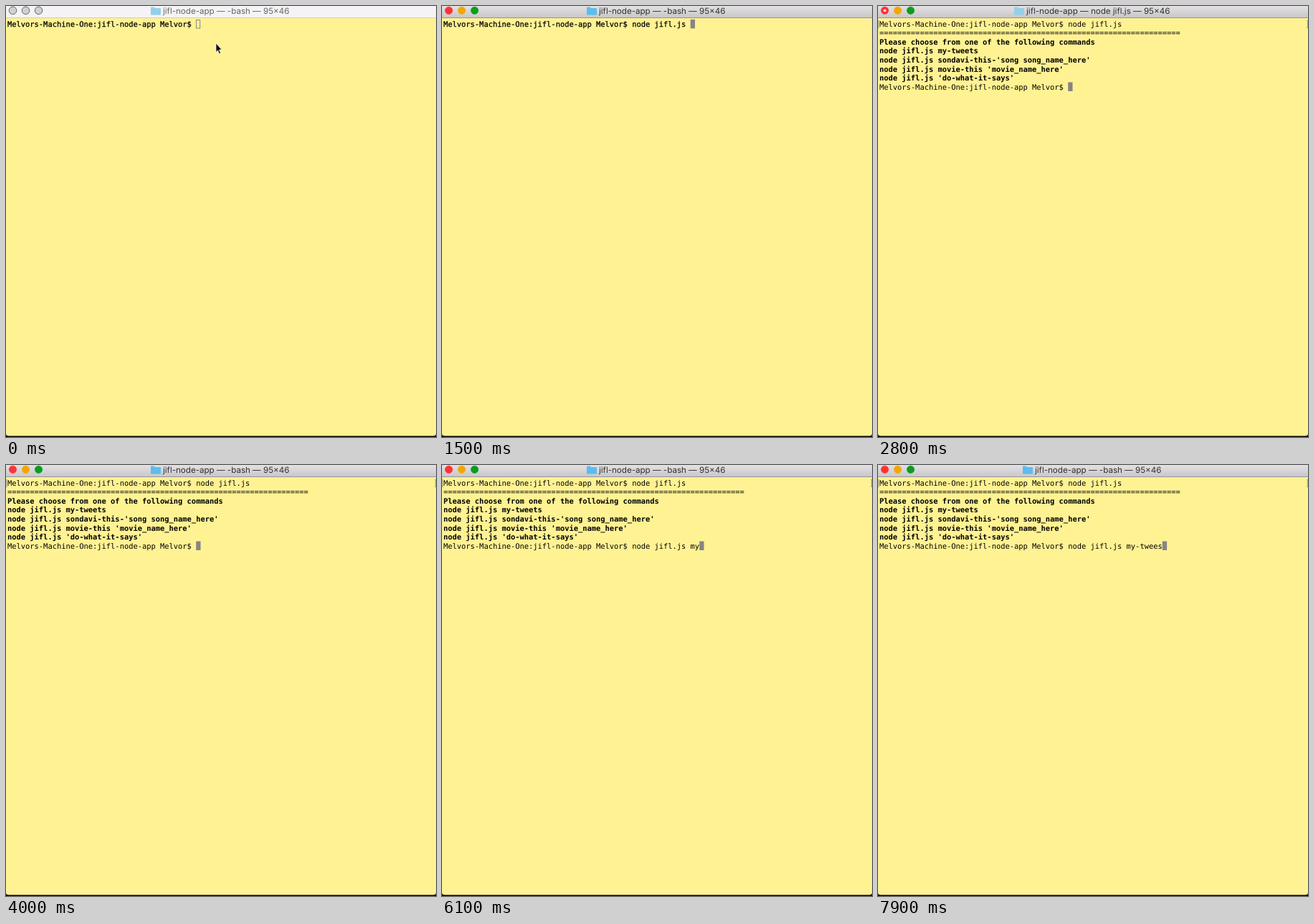
Write an HTML page that moves like this. It is 600 px wide and 602 px high and loops after 8000 ms.

```html
<!DOCTYPE html>
<html lang="en">
<head>
<meta charset="utf-8">
<title>Terminal</title>
<style>
  html, body { margin: 0; width: 100%; height: 100%; overflow: hidden; background: #fff293; }
  svg { display: block; }
  text { white-space: pre; text-rendering: geometricPrecision; }
  #screen { font: 10.41px "DejaVu Sans Mono", monospace; }
  #screen .bold { font-weight: bold; }
  #title { font: 11.6px Inter, sans-serif; text-anchor: middle; }
</style>
</head>
<body>
<svg width="600" height="602" viewBox="0 0 600 602">
  <defs>
    <linearGradient id="chrome" x2="0" y2="1">
      <stop stop-color="#e3e1e3"/>
      <stop offset="1" stop-color="#c9c7ca"/>
    </linearGradient>
  </defs>
  <rect width="600" height="602"/>
  <path d="M0 0H600V597Q600 600.5 596.5 600.5H3.5Q0 600.5 0 597Z" fill="#fff293"/>
  <rect id="bar" width="600" height="16"/>
  <rect id="edge" y="16" width="600" height="1"/>
  <g id="lights">
    <circle cx="9.5" cy="6.3" r="5.3"/>
    <circle cx="27.5" cy="6.3" r="5.3"/>
    <circle cx="45.5" cy="6.3" r="5.3"/>
  </g>
  <circle id="dot" cx="9.5" cy="6.3" r="1.8" fill="#fff"/>
  <path id="folder" d="M0 1.6Q0 .6 1 .6H4.6L6 2H13Q14 2 14 3V10.4Q14 11.4 13 11.4H1Q0 11.4 0 10.4Z"/>
  <text id="title" x="307.2" y="10.9"></text>
  <rect id="caret"/>
  <g id="screen"></g>
  <g id="brackets" fill="none" stroke="#777" stroke-width=".8">
    <path d="M1.6 20.5H.4V30.5H1.6M598.4 20.5H599.6V30.5H598.4"/>
  </g>
  <path id="mouse" d="M0 0V12.6L2.9 9.9L5 14.8L7.2 13.8L5.1 9.1H9Z" stroke="#fff" stroke-width=".8"/>
</svg>
<script>
const LOOP = 8000, STEP = 100;
const ROW = 12.53, COL = 6.267, LEFT = 2;
const PROMPT = "Melvors-Machine-One:jifl-node-app Melvor$ ";
const RUN = "node jifl.js ";
const OUTPUT = [
  "=".repeat(67),
  "Please choose from one of the following commands",
  "node jifl.js my-tweets",
  "node jifl.js sondavi-this-'song song_name_here'",
  "node jifl.js movie-this 'movie_name_here'",
  "node jifl.js 'do-what-it-says'"
];
const ACTIVE = 500, RECALL = 1200, ENTER = 2600, FIRST = 2700, DONE = 2800, IDLE = 2900, AGAIN = 4300;
const KEYS = [[5800, "m"], [6100, "y"], [6500, "-"], [6900, "t"], [7300, "w"], [7500, "e"], [7700, "e"], [7900, "s"]];

const $ = id => document.getElementById(id);
const show = (id, on) => $(id).setAttribute("visibility", on ? "visible" : "hidden");

function set(el, attrs) {
  for (const name in attrs) el.setAttribute(name, attrs[name]);
}

const rows = Array.from({ length: 8 }, (_, i) => {
  const row = document.createElementNS("http://www.w3.org/2000/svg", "text");
  set(row, { x: LEFT, y: 28.9 + i * ROW });
  if (i > 1 && i < 7) row.classList.add("bold");
  return $("screen").appendChild(row);
});

// Lines on screen at time t; the caret follows the last one.
function linesAt(t) {
  if (t < RECALL) return [PROMPT];
  const first = PROMPT + RUN;
  if (t < ENTER) return [first];
  if (t < FIRST) return [first, ""];
  if (t < DONE) return [first, OUTPUT[0], ""];
  const typed = KEYS.filter(([at]) => t >= at).map(([, key]) => key).join("");
  return [first, ...OUTPUT, PROMPT + (t < AGAIN ? "" : RUN + typed)];
}

function drawChrome(t) {
  const active = t >= ACTIVE, running = t >= ENTER && t < IDLE;
  set($("bar"), { fill: active ? "url(#chrome)" : "#f5f3f6" });
  set($("edge"), { fill: active ? "#96949a" : "#cfcdce" });
  const colors = active ? ["#fc3338", "#f2a600", "#0b9c20"] : Array(3).fill("#d1cfd2");
  [...$("lights").children].forEach((light, i) => set(light, {
    fill: colors[i],
    stroke: active ? colors[i] : "#555",
    "stroke-width": active ? .4 : .9
  }));
  show("dot", running);
  set($("folder"), {
    transform: `translate(${running ? 190 : 202} 1)`,
    fill: active && !running ? "#5bbdec" : "#92d0ea"
  });
  $("title").textContent = `jifl-node-app — ${running ? "node jifl.js" : "-bash"} — 95×46`;
  set($("title"), { fill: active ? "#303030" : "#666" });
}

function drawScreen(t) {
  const lines = linesAt(t), last = lines.length - 1;
  rows.forEach((row, i) => row.textContent = lines[i] || "");
  set(rows[0], { stroke: "#000", "stroke-width": t < ENTER ? .25 : 0 });
  const x = LEFT + lines[last].length * COL, y = 18.8 + last * ROW;
  set($("caret"), t < ACTIVE
    ? { x: x + .3, y: y + .7, width: 5.2, height: 11.5, fill: "none", stroke: "#888" }
    : { x, y, width: 6.3, height: 12.5, fill: "#858585", stroke: "none" });
  show("brackets", t >= ENTER);
}

function drawMouse(t) {
  const lift = 7 * Math.min(1, t / ACTIVE);
  set($("mouse"), { transform: `translate(293 ${52 - lift}) scale(.9 1)` });
  show("mouse", t < RECALL);
}

function frame() {
  const t = Math.floor(performance.now() % LOOP / STEP) * STEP;
  drawChrome(t);
  drawScreen(t);
  drawMouse(t);
  requestAnimationFrame(frame);
}
frame();
</script>
</body>
</html>
```
